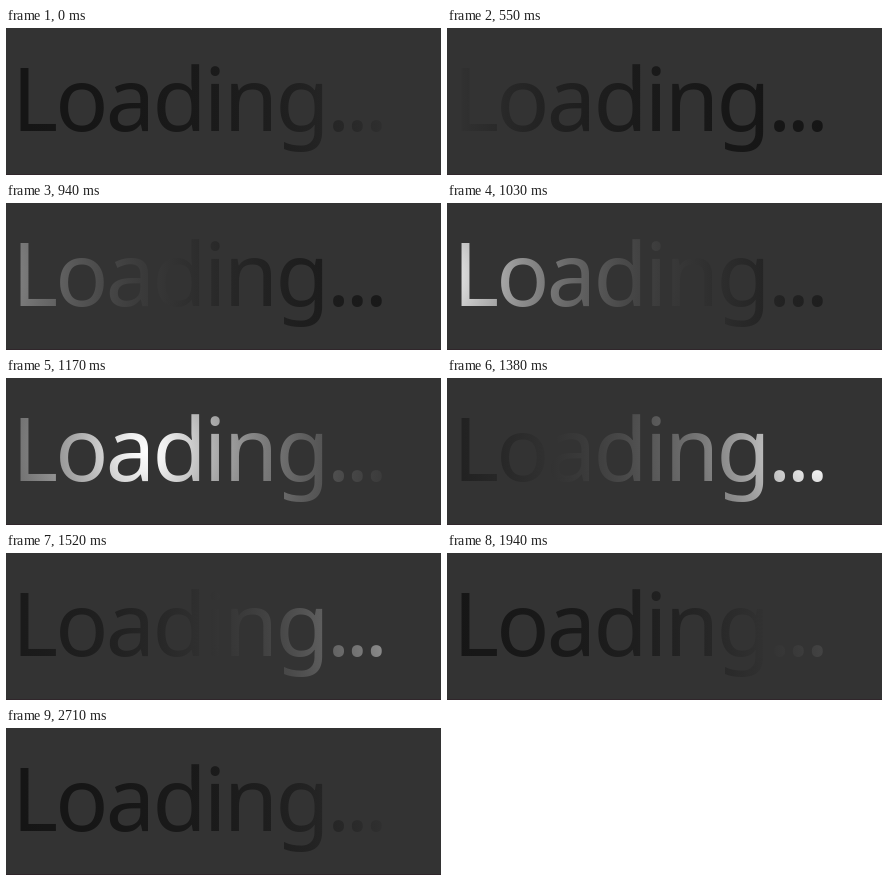
Recreate the animation shown at these times as an HTML page. Size 435 by 147 pixels, loop 2.77 s.

```html
<!DOCTYPE html>
<html lang="en">
<head>
<meta charset="utf-8">
<title>Loading</title>
<style>
  html, body { margin: 0; width: 100%; height: 100%; overflow: hidden; background: #333; }
  svg { display: block; width: 435px; height: 147px; }
  text { font: 400 88px "Noto Sans", "Open Sans", sans-serif; font-kerning: none; letter-spacing: -2.75px; }
  .dots { letter-spacing: -4.8px; }
</style>
</head>
<body>
<svg viewBox="0 0 435 147">
  <defs>
    <radialGradient id="shine" gradientUnits="userSpaceOnUse" cx="0" cy="73" r="700"></radialGradient>
  </defs>
  <rect width="435" height="147" fill="#333"/>
  <rect y="146" width="435" height="1" fill="#30262b"/>
  <text x="6" y="102.7" fill="url(#shine)">Loading<tspan class="dots">...</tspan></text>
</svg>
<script>
  const LOOP = 2770, RADIUS = 700;
  const shine = document.getElementById('shine');

  // grey fades exponentially with distance, softened at the peak
  const grey = d => Math.round(20 + 235 * Math.exp((20 - Math.hypot(d, 20)) / 122));

  for (let d = 0; d <= RADIUS; d += 20) {
    const v = grey(d);
    const stop = document.createElementNS('http://www.w3.org/2000/svg', 'stop');
    stop.setAttribute('offset', d / RADIUS);
    stop.setAttribute('stop-color', `rgb(${v},${v},${v})`);
    shine.append(stop);
  }

  // fast sweep through the middle with a slow drift at both ends
  const sweep = t => 155 + 381 * Math.tanh((t - 1182) / 330) + 0.08 * (t - 1182);

  // moments when the picture updates: even steps during the sweep, sparse outside it
  const evenSteps = Array.from({ length: 9 }, (_, i) => 1030 + 70 * i);
  const ticks = [0, 550, 760, 940, ...evenSteps, 1730, 1940, 2710];

  const start = performance.now();
  function draw() {
    const t = (performance.now() - start) % LOOP;
    const tick = ticks.findLast(at => at <= t);
    const x = sweep(tick || LOOP);
    shine.setAttribute('cx', x);
    shine.setAttribute('fx', x);
    requestAnimationFrame(draw);
  }
  draw();
</script>
</body>
</html>
```
